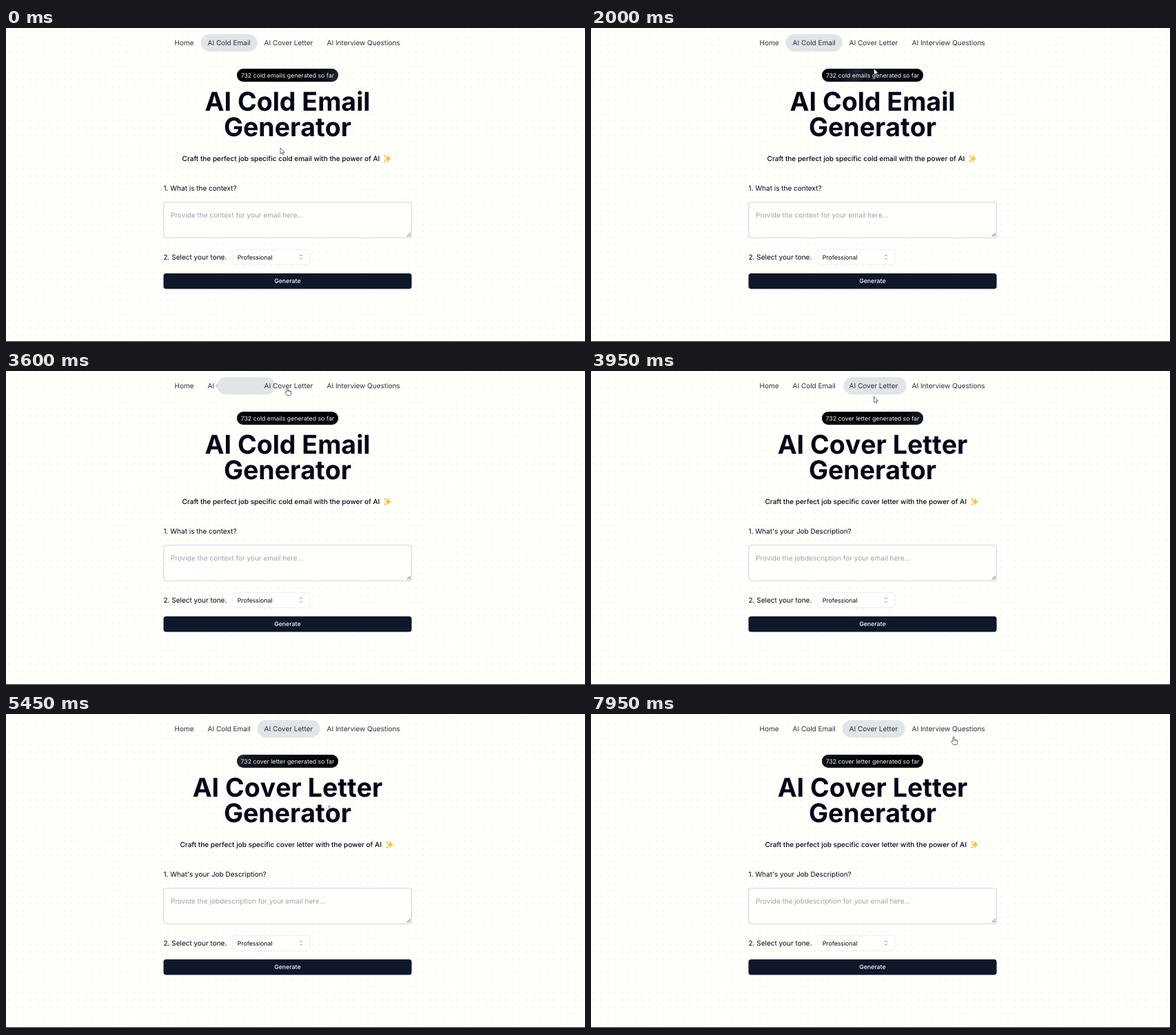
Animation, 840 px wide and 457 px high, one loop 8000 ms. Source, as an HTML page:

```html
<!DOCTYPE html>
<html lang="en">
<head>
<meta charset="utf-8">
<title>AI Generator</title>
<style>
  html, body { margin: 0; width: 100%; height: 100%; overflow: hidden; }
  body {
    position: relative;
    background: radial-gradient(#eff0f0 .625px, transparent 1px) 0 0 / 10px 10px #fffffb;
  }
  svg { position: absolute; left: 0; top: 0; }
  text {
    font: 400 10px Inter, sans-serif;
    font-optical-sizing: none;
    text-rendering: geometricPrecision;
    fill: #020617;
    white-space: pre;
  }
  #badge {
    position: absolute; top: 59px; height: 18.5px;
    border-radius: 10px;
    background: linear-gradient(110deg, #000103, 45%, #1e2631, 55%, #000103) 0 0 / 200% 100%;
    box-shadow: inset 0 0 0 .6px #1e293b;
  }
  #nav text { fill: #2b303b; }
  #craft { font-weight: 500; }
  .mid { text-anchor: middle; }
  .small { font-size: 8.75px; }
  .title { font-size: 37.5px; font-weight: 700; font-kerning: none; }
  .hint { fill: #9ca3af; }
</style>
</head>
<body>
<div id="badge"></div>
<svg width="840" height="457" viewBox="0 0 840 457">
  <defs>
    <path id="star" d="M0-1Q.17-.17 1 0Q.17.17 0 1Q-.17.17-1 0Q-.17-.17 0-1Z" fill="#fbc138"/>
  </defs>

  <g id="nav">
    <text x="244.5" y="25.1">Home</text>
    <rect id="pill" y="9" height="25" rx="12.5" fill="#e1e5e8"/>
    <text id="coldLink" x="292.5" y="25.1">AI Cold Email</text>
    <text id="coverLink" x="374.5" y="25.1">AI Cover Letter</text>
    <text x="465.5" y="25.1">AI Interview Questions</text>
  </g>

  <text id="count" class="mid small" x="408.4" y="71.6" style="fill:#f1f5f9"></text>
  <text id="title" class="mid title" x="408.5" y="119.7"></text>
  <text class="mid title" x="408.5" y="157.2">Generator</text>

  <g id="tagline">
    <text id="craft" x="255.6" y="193.2"></text>
    <use href="#star" transform="translate(554.2 189.6) scale(5.2 5.6)"/>
    <use href="#star" transform="translate(549.8 186.2) scale(2.1)"/>
    <use href="#star" transform="translate(550 193.2) scale(2.2)"/>
  </g>

  <text id="question" x="228.5" y="236"></text>
  <rect x="228.8" y="252.8" width="359.5" height="51.4" rx="3.5" fill="#fffffb" stroke="#d1d5db" stroke-width="1.1"/>
  <text id="hint" class="hint" x="239" y="274.6"></text>
  <path d="M581.8 302.3l5-5M584.6 302.5l2.3-2.3" stroke="#444" stroke-width=".9"/>

  <text x="228.5" y="336">2. Select your tone.</text>
  <rect x="328.6" y="321.3" width="112.2" height="22" rx="3.5" fill="#fffffb" stroke="#e2e8f0" stroke-width=".7"/>
  <text class="small" x="335.7" y="335.5">Professional</text>
  <path d="M426.2 331l1.8-2 1.8 2M426.2 333.6l1.8 2 1.8-2" fill="none" stroke="#666b78" stroke-width=".7"/>

  <rect x="228.5" y="356" width="360" height="22.5" rx="3.75" fill="#0f172a"/>
  <text class="mid small" x="408.4" y="370.4" style="fill:#f8fafc;font-weight:500">Generate</text>
  <rect y="454.5" width="840" height="2.5" fill="#1c1e1f"/>

  <g id="cursor" stroke-linejoin="round">
    <path id="arrow" d="M0 0V8.6L2 6.9 3.3 9.7 4.6 9.1 3.4 6.3H6Z" fill="#fff" stroke="#333" stroke-width=".7"/>
    <path id="beam" d="M-1.9-5H-.4L0-4.6.4-5H1.9M0-4.6V4.6M-1.9 5H-.4L0 4.6.4 5H1.9" fill="none" stroke="#5c5f66" stroke-width=".8"/>
    <path id="hand" d="M-1 7V1Q-1 0 0 0T1 1V4.2Q2.2 3.6 2.8 4.6 3.9 4.1 4.4 5.1 5.7 4.8 5.7 6.2V8Q5.7 9.8 4.6 11.5H-.4Q-1.4 9.7-3 7.8-3.6 6.4-2.5 6.2-1.7 6.2-1 7ZM1 4.2V6M2.8 4.6V6.2M4.4 5.1V6.4" fill="#fff" stroke="#333" stroke-width=".7"/>
  </g>
</svg>

<script>
const LOOP = 8000, STEP = 50;
const CLICK = 3525, SWAP = 3900, SHIMMER = 3000;
const $ = id => document.getElementById(id);

const pages = [
  { kind: 'cold emails', title: 'AI Cold Email', topic: 'cold email', question: 'What is the context?',
    subject: 'context', shift: 0, left: 335, width: 146.5 },
  { kind: 'cover letter', title: 'AI Cover Letter', topic: 'cover letter', question: "What's your Job Description?",
    subject: 'jobdescription', shift: 3.1, left: 334.5, width: 147.5 }
];

// time, x, y of the pointer's hot spot
const route = [
  [0, 398, 174], [800, 398, 174], [1400, 404, 128], [2000, 410.5, 59],
  [2500, 409, 26], [3150, 408, 24], [3700, 408, 24], [3950, 410.5, 37],
  [4350, 415, 56], [5000, 456, 124], [5450, 469, 139], [6050, 488, 132],
  [6900, 514, 91], [7700, 524.5, 42], [7950, 526, 33]
];

const mix = (a, b, k) => a + (b - a) * k;

function pointerAt(t) {
  const i = Math.max(1, route.findIndex(p => p[0] >= t));
  const [a, b] = [route[i - 1], route[i]];
  const k = (t - a[0]) / (b[0] - a[0]);
  const ease = k * k * (3 - 2 * k);
  return [mix(a[1], b[1], ease), mix(a[2], b[2], ease)];
}

// Underdamped spring from 0 to 1
function spring(seconds) {
  if (seconds <= 0) return 0;
  const decay = 9.75, freq = 8.6, a = freq * seconds;
  return 1 - Math.exp(-decay * seconds) * (Math.cos(a) + decay / freq * Math.sin(a));
}

let shown;
function showPage(page) {
  if (page === shown) return;
  shown = page;
  $('count').textContent = `732 ${page.kind} generated so far`;
  $('title').textContent = page.title;
  $('craft').textContent = `Craft the perfect job specific ${page.topic} with the power of AI`;
  $('question').textContent = `1. ${page.question}`;
  $('hint').textContent = `Provide the ${page.subject} for your email here...`;
  $('craft').setAttribute('x', 255.6 - 2 * page.shift);
  $('tagline').setAttribute('transform', `translate(${page.shift} 0)`);
  $('badge').style.left = page.left + 'px';
  $('badge').style.width = page.width + 'px';
}

function drawPill(t) {
  // The pill belongs to the active link, so it covers the links before it
  const link = $(t < CLICK ? 'coldLink' : 'coverLink');
  if ($('pill').nextElementSibling !== link) $('nav').insertBefore($('pill'), link);
  const k = spring((t - CLICK) / 1000);
  $('pill').setAttribute('x', mix(282.5, 364.5, k));
  $('pill').setAttribute('width', mix(82, 91, k));
}

function drawCursor(t) {
  const [x, y] = pointerAt(t);
  const shape = y < 35 ? 'hand' : y > 87 && y < 163 ? 'beam' : 'arrow';
  for (const id of ['arrow', 'beam', 'hand']) $(id).style.display = id === shape ? '' : 'none';
  $('cursor').setAttribute('transform', `translate(${x} ${y})`);
}

function draw(now) {
  const t = Math.floor(now % LOOP / STEP) * STEP;
  showPage(pages[t < SWAP ? 0 : 1]);
  const phase = (t < SWAP ? t : t - SWAP) % SHIMMER / SHIMMER;
  $('badge').style.backgroundPosition = `${-200 * phase}% 0`;
  drawPill(t);
  drawCursor(t);
}

const start = performance.now();
function tick() {
  draw(performance.now() - start);
  requestAnimationFrame(tick);
}
tick();
</script>
</body>
</html>
```
